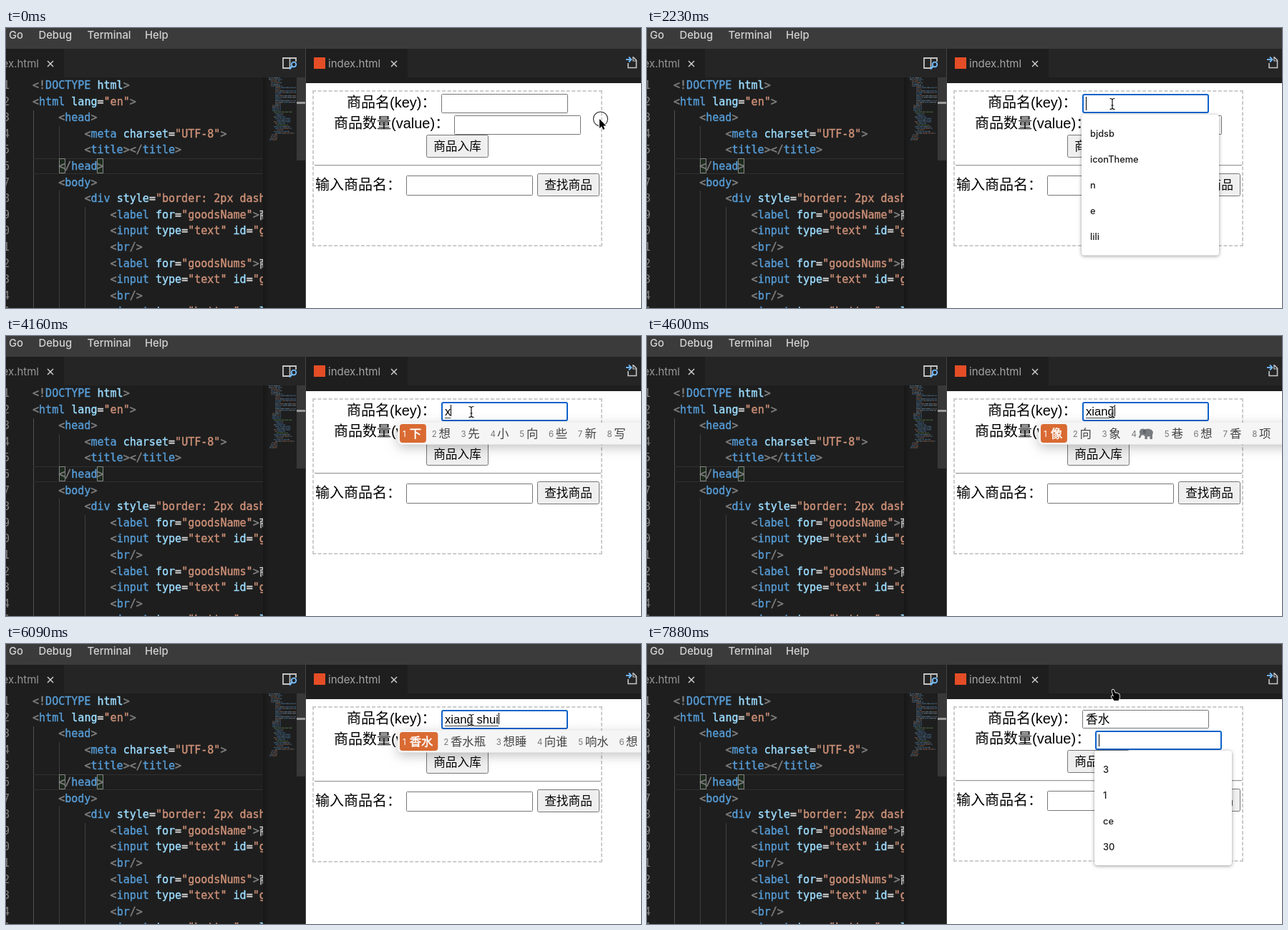
An HTML page with a canvas for the animation above (8 s loop, 887x391 px).

```html
<!DOCTYPE html>
<html lang="zh-CN">
<head>
<meta charset="UTF-8">
<title>Form demo</title>
<style>
html, body { margin: 0; width: 100%; height: 100%; overflow: hidden; background: #1e1e1e; }
canvas { display: block; }
</style>
</head>
<body>
<canvas id="stage" width="887" height="391"></canvas>
<script>
const ctx = document.getElementById('stage').getContext('2d');
const W = 887, H = 391, LOOP = 8000;
const UI = 'Inter, "Noto Sans CJK SC", sans-serif';
const MONO = '"DejaVu Sans Mono", "Noto Sans CJK SC", monospace';
const PAGE = '"Liberation Sans", "Noto Sans CJK SC", "Noto Sans CJK", sans-serif';

// ---------- helpers ----------
function rect(x, y, w, h, color) {
  ctx.fillStyle = color;
  ctx.fillRect(x, y, w, h);
}
// bold: width of a thin outline that thickens the glyphs
function text(str, x, y, font, color, align = 'left', bold = 0) {
  ctx.font = font;
  ctx.fillStyle = color;
  ctx.textAlign = align;
  ctx.fillText(str, x, y);
  if (bold) {
    ctx.strokeStyle = color;
    ctx.lineWidth = bold;
    ctx.strokeText(str, x, y);
  }
}
function box(x, y, w, h, r, fill, stroke, lw = 1) {
  ctx.beginPath();
  ctx.roundRect(x, y, w, h, r);
  if (fill) { ctx.fillStyle = fill; ctx.fill(); }
  if (stroke) { ctx.strokeStyle = stroke; ctx.lineWidth = lw; ctx.stroke(); }
}
function poly(pts, color, lw) {
  ctx.beginPath();
  pts.forEach(([x, y], i) => i ? ctx.lineTo(x, y) : ctx.moveTo(x, y));
  ctx.strokeStyle = color;
  ctx.lineWidth = lw;
  ctx.stroke();
}
function ring(x, y, r, color, lw) {
  ctx.beginPath();
  ctx.arc(x, y, r, 0, Math.PI * 2);
  ctx.strokeStyle = color;
  ctx.lineWidth = lw;
  ctx.stroke();
}
function ellipse(x, y, rx, ry, color) {
  ctx.beginPath();
  ctx.ellipse(x, y, rx, ry, 0, 0, Math.PI * 2);
  ctx.fillStyle = color;
  ctx.fill();
}
function shadowed(blur, dy, alpha, draw) {
  ctx.save();
  ctx.shadowColor = `rgba(0,0,0,${alpha})`;
  ctx.shadowBlur = blur;
  ctx.shadowOffsetY = dy;
  draw();
  ctx.restore();
}
// last entry whose time has been reached
function at(list, t) {
  let hit = list[0];
  for (const e of list) if (e[0] <= t) hit = e;
  return hit;
}

// ---------- editor ----------
const CH = 9.05, LINE = 22.6, TOP = 85;
const CODE_FONT = '15.03px ' + MONO;
const CODE = [
  '<!DOCTYPE html>',
  '<html lang="en">',
  '    <head>',
  '        <meta charset="UTF-8">',
  '        <title></title>',
  '    </head>',
  '    <body>',
  '        <div style="border: 2px dashed #ccc">',
  '            <label for="goodsName">商品名',
  '            <input type="text" id="goodsName">',
  '            <br/>',
  '            <label for="goodsNums">商品数量',
  '            <input type="text" id="goodsNums">',
  '            <br/>',
  '            <input type="button" value="ok">'
];
const TOKEN = /"[^"]*"?|<[\/!]?|\/?>|=|[^\s"<>=\/]+|\s+/g;

function codeLine(str, y) {
  let col = 0, prev = '', inTag = false;
  for (const tok of str.match(TOKEN)) {
    let color = '#d4d4d4';
    if (/^(<|\/?>)/.test(tok)) { color = '#808080'; inTag = tok[0] === '<'; }
    else if (tok[0] === '"') color = '#ce9178';
    else if (prev[0] === '<') color = '#569cd6';
    else if (inTag && tok !== '=') color = '#9cdcfe';
    if (tok.trim()) text(tok, 37 + col * CH, y, CODE_FONT, color, 'left', 0.4);
    col += tok.length;
    prev = tok;
  }
}

function minimap() {
  let seed = 11;
  const rnd = () => (seed = seed * 16807 % 2147483647) / 2147483647;
  const tints = ['#3f6685', '#61798a', '#7d5d4c', '#42668a'];
  ctx.globalAlpha = 0.75;
  for (let i = 0; i < 39; i++) {
    const indent = i < 2 ? 0 : i < 6 ? 3 : i < 17 ? 9 : i < 21 ? 5 : i < 35 ? 7 + i % 3 * 2 : 39 - i;
    const end = i < 6 ? 16 + i % 2 * 3 : i < 17 ? (i % 3 === 1 ? 17 : 38) : i < 21 ? 17 : i > 34 ? 12 : 20 + rnd() * 18;
    let x = indent;
    while (x < end) {
      const w = Math.min(2 + rnd() * 5, end - x);
      const green = i === 21 || i === 29;
      rect(367 + x, 69 + i * 2.27, w, 1.3, green ? '#4c7040' : tints[Math.floor(rnd() * 4)]);
      x += w + 0.8;
    }
  }
  ctx.globalAlpha = 1;
}

function editor() {
  rect(0, 0, W, H, '#1e1e1e');
  rect(0, 0, W, 29, '#3b3b3b');
  [['Go', 4], ['Debug', 45.5], ['Terminal', 113.5], ['Help', 194]]
    .forEach(([s, x]) => text(s, x, 15, '500 14.8px ' + UI, '#d2d2d2'));

  rect(0, 29, W, 40, '#252526');
  rect(0, 29, 81, 40, '#1e1e1e');
  rect(419, 29, 142, 40, '#1e1e1e');
  text('ex.html', 46, 55, '15px ' + UI, '#969696', 'right');
  text('index.html', 450, 55, '15px ' + UI, '#a5a5a5');
  rect(430, 41, 16, 16, '#e44d26');
  for (const x of [62, 542]) {
    poly([[x - 4, 46], [x + 4, 54]], '#d0d0d0', 1.4);
    poly([[x + 4, 46], [x - 4, 54]], '#d0d0d0', 1.4);
  }

  // preview icon
  poly([[397, 56], [387, 56], [387, 42], [405, 42], [405, 47]], '#c5c5c5', 1.8);
  poly([[396.5, 42], [396.5, 56]], '#c5c5c5', 1.6);
  ring(402, 51, 3.3, '#75beff', 1.8);
  poly([[399.6, 53.6], [396, 57.5]], '#75beff', 2.2);
  // open-file icon
  poly([[869, 49], [869, 55.5], [880.5, 55.5], [880.5, 45], [876.5, 41], [875, 41]], '#c5c5c5', 1.6);
  poly([[876, 41], [876, 46], [880, 46]], '#c5c5c5', 1.2);
  poly([[866, 44], [873, 44]], '#75beff', 1.8);
  poly([[870, 40.5], [873.5, 44], [870, 47.5]], '#75beff', 1.8);

  // guides and current line
  rect(38, 115, 1, 276, '#505050');
  rect(74, 137, 1, 45, '#404040');
  rect(74, 227, 1, 164, '#404040');
  rect(110, 250, 1, 141, '#404040');
  rect(38, 182, 322, 1, '#303030');
  rect(38, 203, 322, 1, '#303030');
  box(74.5, 182.5, 8, 20, 0, '#1c2a1c', '#888888');
  box(127.5, 182.5, 8, 20, 0, '#1c2a1c', '#888888');

  ctx.save();
  ctx.beginPath();
  ctx.rect(0, 69, 359, 322);
  ctx.clip();
  CODE.forEach((s, i) => {
    const y = TOP + i * LINE;
    text(String((i + 1) % 10), 5, y, CODE_FONT, '#858585', 'right');
    codeLine(s, y);
  });
  ctx.restore();

  const edge = ctx.createLinearGradient(359, 0, 367, 0);
  edge.addColorStop(0, '#171717');
  edge.addColorStop(1, '#1e1e1e');
  rect(359, 69, 8, 322, edge);
  minimap();
  rect(406, 69, 12, 116, '#383838');
  rect(406, 103, 12, 3, '#9c9c9c');
  rect(418, 29, 1, 362, '#444444');
}

// ---------- page ----------
function field(x, y, h, focus) {
  if (focus) box(x + 1, y + 1, 175, h - 2, 2, '#fff', '#0f62c9', 2);
  else box(x + 0.5, y + 0.5, 176, h - 1, 1, '#fff', '#767676');
}
function button(label, x, y, hover) {
  box(x + 0.5, y + 0.5, 86, 31, 2, hover ? '#e2e2e2' : '#efefef', '#767676');
  text(label, x + 43.5, y + 22.3, '16.67px ' + PAGE, '#000', 'center');
}
// each side starts and ends with a full dash
function dashedSide(x, y, w, h) {
  const len = w || h, dash = 5;
  const gaps = Math.round((len - dash) / (dash + 2.5));
  ctx.setLineDash([dash, (len - dash) / gaps - dash]);
  poly([[x, y], [x + w, y + h]], '#cccccc', 2);
}
function dashedBox(h) {
  ctx.save();
  dashedSide(428, 88, 405, 0);
  dashedSide(428, 86 + h, 405, 0);
  dashedSide(429, 87, 0, h);
  dashedSide(832, 87, 0, h);
  ctx.restore();
}

function page(focus, up, hover) {
  const label = (s, x, y) => text(s, x, y, '20px ' + PAGE, '#000');
  rect(419, 77, 468, 314, '#fff');
  dashedBox(218 - up);
  label('商品名(key)：', 476, 111);
  field(608, 92, 27 - up, focus === 1);
  label('商品数量(value)：', 458, 140 - up);
  field(626, 122 - up, 27, focus === 2);
  button('商品入库', 587, 149 - up, hover);
  rect(431, 191 - up, 400, 1, '#9a9a9a');
  rect(431, 192 - up, 400, 1, '#e6e6e6');
  label('输入商品名：', 432, 225.5 - up);
  field(559, 206 - up, 28, false);
  button('查找商品', 742, 203 - up, false);
}

function dropdown(x, y, h, items) {
  shadowed(5, 1, 0.4, () => box(x, y, 192, h, 4, '#fff'));
  items.forEach((s, i) => text(s, x + 12, y + 31 + i * 36, '500 12.8px ' + UI, '#1c1c1c'));
}

function elephant(x, y) {
  const c = '#777b80';
  ellipse(x + 12, y + 6, 7.5, 5.5, c);
  ellipse(x + 5, y + 5, 4.5, 4.5, c);
  [8, 15].forEach(dx => rect(x + dx, y + 8, 3.5, 7, c));
  poly([[x + 3, y + 6], [x + 1.5, y + 11], [x, y + 13]], c, 2.5);
  ellipse(x + 7.5, y + 4.5, 2, 3, '#5f6368');
}

function candidates(words) {
  shadowed(16, 4, 0.24, () => box(547, 121, 360, 30.5, 6, '#f5f5f5'));
  let x = 554;
  words.split(' ').forEach((word, i) => {
    const first = i === 0, animal = word === '*';
    const w = animal ? 22 : word.length * 16.4;
    if (first) box(550, 123, w + 20.5, 26, 4, '#d96a32');
    text(String(i + 1), x, 140.5, '11.5px ' + UI, first ? '#fff' : '#777');
    if (animal) elephant(x + 11, 129);
    else text(word, x + 9.7, 142, '16.4px ' + PAGE, first ? '#fff' : '#444', 'left', first ? 0.5 : 0);
    x += w + 24.4;
  });
}

// ---------- pointers ----------
function shape(path, x, y, fill, stroke, lw) {
  const p = new Path2D(path);
  ctx.save();
  ctx.translate(x, y);
  ctx.lineJoin = 'round';
  ctx.strokeStyle = stroke;
  ctx.lineWidth = lw;
  ctx.stroke(p);
  if (fill) { ctx.fillStyle = fill; ctx.fill(p); }
  ctx.restore();
}
const ARROW = 'M0 0V13L3 10.2L5 15L7.3 14L5.3 9.4H9.3Z';
const BEAM = 'M-3.5 -7.5Q0 -7.5 0 -5.5Q0 -7.5 3.5 -7.5M0 -6V6M-3.5 7.5Q0 7.5 0 5.5Q0 7.5 3.5 7.5M-1.5 2H1.5';
const HAND = 'M-3 -6Q-1.5 -7 -.5 -5L1 -1Q2 -2.4 3 -1Q4.2 -2 5 -.4Q6.4 -1 6.8 1L7 5L5.5 9H-.5L-4 4.5Q-5 2.4 -3 2.3L-1.2 3.2L-3.5 -4Z';

function pointer([, x, y, kind, click]) {
  if (click) ring(x + (kind === 'arrow' ? 1.5 : 0.5), y, 10, '#222', 1.1);
  if (kind === 'arrow') shape(ARROW, x, y, '#000', '#fff', 2);
  else if (kind === 'hand') shape(HAND, x, y, '#000', '#fff', 1.6);
  else {
    shape(BEAM, x, y, null, 'rgba(255,255,255,.8)', 2.6);
    shape(BEAM, x, y, null, '#000', 1.1);
  }
}

// ---------- timeline ----------
const MOUSE = [
  [0, 829, 127, 'arrow', true],
  [150, 815, 146, 'arrow'],
  [300, 768, 178, 'arrow'],
  [450, 704, 187, 'arrow'],
  [590, 655, 164, 'arrow'],
  [740, 650, 106, 'beam'],
  [1190, 650, 105, 'beam', true],
  [1340, 650, 106, 'beam'],
  [6990, 653, 121, 'beam'],
  [7140, 656, 135, 'beam'],
  [7290, 656, 135, 'beam', true],
  [7430, 656, 135, 'beam'],
  [7580, 655, 112, 'beam'],
  [7730, 654, 88, 'arrow'],
  [7880, 653, 70, 'hand']
];
const TYPED = [
  [0, ''],
  [4160, 'x', '下 想 先 小 向 些 新 写'],
  [4310, 'xi', '系 西 洗 喜 细 戏 吸 习'],
  [4450, 'xia', '下 夏 吓 虾 瞎 侠 峡 霞'],
  [4600, 'xiang', '像 向 象 * 巷 想 香 项'],
  [5640, 'xiang s', '像是 想说 想死 相似 享受 想'],
  [5790, 'xiang sh', '像是 想说 享受 相识 想睡 想'],
  [5940, 'xiang shu', '橡树 香树 详述 像素 想输 想'],
  [6090, 'xiang shui', '香水 香水瓶 想睡 向谁 响水 想'],
  [6540, '香水']
];
const CARET = [
  [0, 0], [1190, 1], [1630, 0], [2230, 1], [2670, 0], [3120, 1], [3710, 0],
  [4160, 1], [5200, 0], [5640, 1], [6540, 0], [6690, 1]
];

function draw(t) {
  const focus = t < 1190 ? 0 : t < 7290 ? 1 : 2;
  const up = t >= 6540 ? 1 : 0;
  const [, typed, words] = at(TYPED, t);

  editor();
  page(focus, up, t >= 590 && t < 740);

  text(typed, 613, 111, '16.67px ' + PAGE, '#000');
  const width = ctx.measureText(typed).width;
  if (words) rect(613, 114, width, 1, '#444');
  if (at(CARET, t)[1]) {
    if (focus === 2) rect(631, 126, 1, 17, '#000');
    else rect(613 + Math.round(width), 96, 1, words ? 16 : 19, '#000');
  }

  if (t >= 1340 && t < 4160) dropdown(607, 121, 196.5, ['bjdsb', 'iconTheme', 'n', 'e', 'lili']);
  if (t >= 7430) dropdown(625, 149, 160, ['3', '1', 'ce', '30']);
  if (words) candidates(words);
  pointer(at(MOUSE, t));
}

const start = performance.now();
function tick() {
  draw((performance.now() - start) % LOOP);
  requestAnimationFrame(tick);
}
tick();
</script>
</body>
</html>
```
